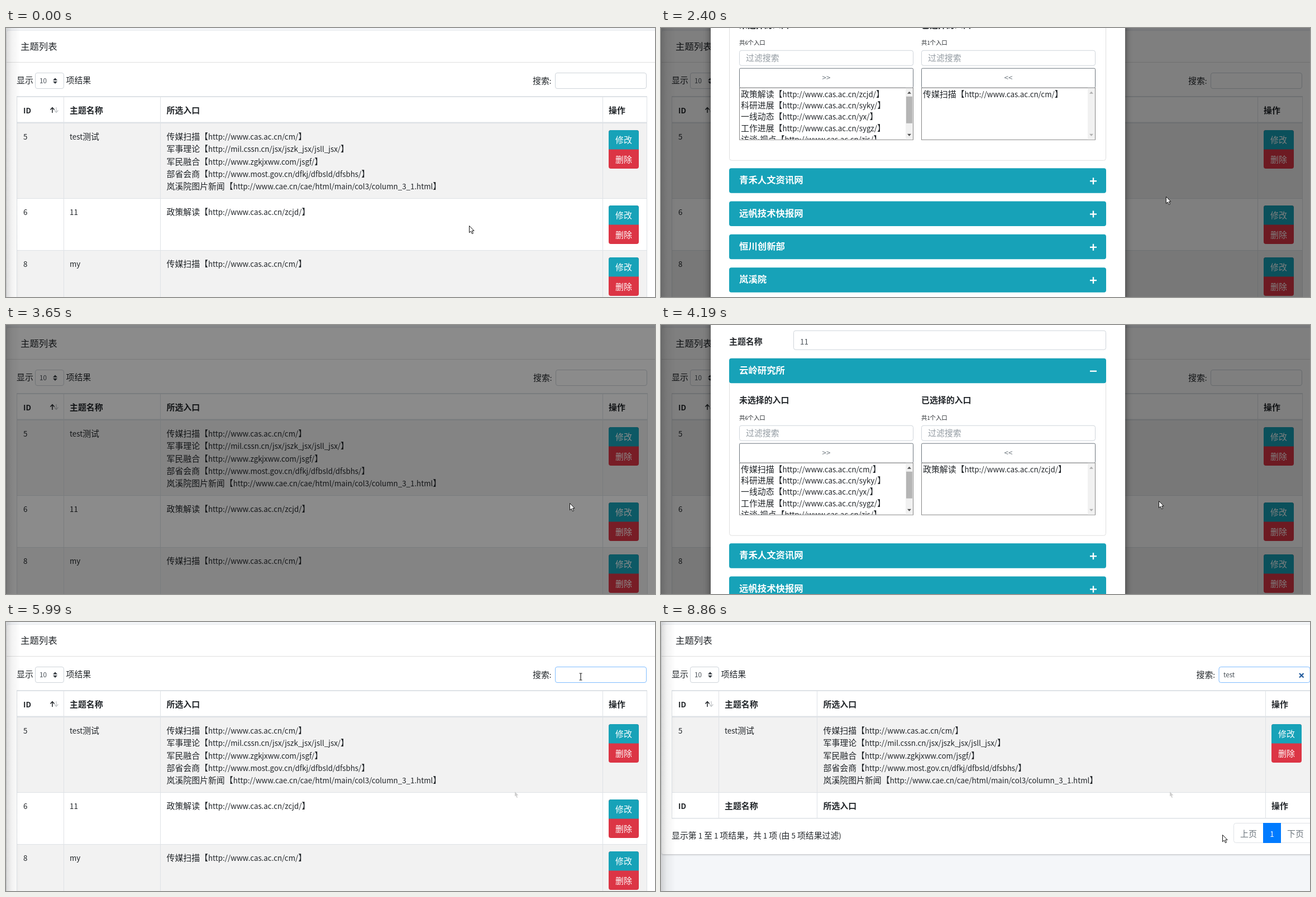
Animation, 1162 px wide and 482 px high, one loop 9030 ms. Source, as an HTML page:

```html
<!DOCTYPE html>
<html lang="zh-CN">
<head>
<meta charset="utf-8">
<title>主题列表</title>
<style>
html, body { margin: 0; width: 100%; height: 100%; overflow: hidden; background: #f4f6f9; }
svg { display: block; }
text { font-family: "Noto Sans CJK SC", "Noto Sans CJK JP", "Noto Sans CJK", sans-serif; white-space: pre; }
</style>
</head>
<body>
<svg id="stage" width="1162" height="482" viewBox="0 0 1162 482"></svg>
<script>
const LOOP = 9030, INK = '#212529', LINE = '#dee2e6', EDGE = '#ced4da', TEAL = '#17a2b8';
const stage = document.getElementById('stage');
const $ = id => document.getElementById(id);

// Latin runs are set smaller so they sit at the same em as the Chinese text; the middle dot stays narrow.
const latin = s => s
  .replace(/[ -~]+/g, run => `<tspan font-size=".895em">${run.replace(/</g, '&lt;')}</tspan>`)
  .replace('·', '<tspan font-family="Noto Sans, sans-serif">·</tspan>');
const text = (x, mid, s, { size = 14.9, bold, fill = INK, anchor = 'start' } = {}) =>
  `<text x="${x}" y="${mid + size * .37}" font-size="${size}" font-weight="${bold ? 700 : 400}" fill="${fill}" text-anchor="${anchor}">${latin(s)}</text>`;
const rect = (x, y, w, h, fill, r = 0, more = '') =>
  `<rect x="${x}" y="${y}" width="${w}" height="${h}" fill="${fill}" rx="${r}" ${more}/>`;
const box = (x, y, w, h, r = 3.5, stroke = EDGE, more = '') =>
  rect(x + .5, y + .5, w - 1, h - 1, '#fff', r, `stroke="${stroke}" ${more}`);
const path = (d, fill, more = '') => `<path d="${d}" fill="${fill}" ${more}/>`;

// Entries: title and address
const url = (name, address) => `${name}【http://${address}】`;
const media = url('传媒扫描', 'www.cas.ac.cn/cm/');
const policy = url('政策解读', 'www.cas.ac.cn/zcjd/');
const others = [['科研进展', 'syky'], ['一线动态', 'yx'], ['工作进展', 'sygz'], ['访谈·视点', 'zjs']]
  .map(([name, dir]) => url(name, `www.cas.ac.cn/${dir}/`));
const rows = [
  { y: 171, h: 134, id: '5', name: 'test测试', list: [media,
    url('军事理论', 'mil.cssn.cn/jsx/jszk_jsx/jsll_jsx/'),
    url('军民融合', 'www.zgkjxww.com/jsgf/'),
    url('部省会商', 'www.most.gov.cn/dfkj/dfbsld/dfsbhs/'),
    url('岚溪院图片新闻', 'www.cae.cn/cae/html/main/col3/column_3_1.html')] },
  { y: 305, h: 93, id: '6', name: '11', list: [policy] },
  { y: 398, h: 93, id: '8', name: 'my', list: [media] },
];

function buttons(x, y) {
  return rect(x, y, 54, 69, '#dc3545', 4) +
    path(`M${x} ${y + 34.5}v-30.5q0 -4 4 -4h46q4 0 4 4v30.5z`, TEAL) +
    text(x + 27, y + 17, '修改', { fill: '#fff', anchor: 'middle' }) +
    text(x + 27, y + 52.5, '删除', { fill: '#fff', anchor: 'middle' });
}

function table(cols, shown, bottom, foot) {
  const [c1, c2, c3] = cols;
  const heads = mid => ['ID', '主题名称', '所选入口', '操作'].map((s, i) =>
    text([31, c1 + 11, c2 + 11.5, c3 + 11][i], mid, s, { bold: true })).join('');
  const width = foot ? 1143 : 1129;
  let out = heads(147) +
    path(`M${c1 - 20} 152v-9.5m-3.6 4l3.6 -4l3.6 4`, 'none', `stroke="${INK}" stroke-width="1.5"`) +
    path(`M${c1 - 13} 142v9.5m-3.4 -4l3.4 4l3.4 -4`, 'none', 'stroke="#c4c7ca" stroke-width="1.3"');
  shown.forEach((row, i) => {
    if (i % 2 === 0) out += rect(19, row.y, width, row.h, '#f2f2f2');
    const mid = row.y + (i ? 24 : 23.5);
    out += text(31, mid, row.id) + text(c1 + 11, mid, row.name) +
      row.list.map((s, n) => text(c2 + 11.5, mid + n * 22.35, s)).join('') +
      buttons(c3 + 11, row.y + (i ? 13 : 12));
  });
  out += rect(19, 122, width, 2, LINE) + rect(19, 168.5, width, 2.5, LINE);
  out += shown.slice(1).map(row => rect(19, row.y, width, 1, LINE)).join('');
  out += [19, ...cols].map(x => rect(x, 122, 1, bottom - 122, LINE)).join('');
  if (foot) out += rect(19, 305, width, 1, LINE) + heads(329) + rect(19, 351, width, 1.5, LINE);
  return out;
}

function results() {
  const gray = { fill: '#6c757d' };
  return table([103, 279, 1082], rows.slice(0, 1), 352, true) +
    text(19, 382, '显示第 1 至 1 项结果，共 1 项 (由 5 项结果过滤)') +
    box(1025, 360, 150, 36, 4, LINE) + rect(1078, 360, 32, 36, '#007bff') +
    text(1037, 379, '上页', gray) + text(1121, 379, '下页', gray) +
    text(1094, 379, '1', { fill: '#fff', anchor: 'middle' });
}

const searchBox = () => '<g id="search">' +
  text(943, 94, '搜索:') + box(983, 80, 164, 29, 3.5, EDGE, 'id="field"') +
  '<g id="typed"></g>' +
  path('M1127.5 92l7.5 7.5m0 -7.5l-7.5 7.5', 'none', 'id="clear" stroke="#1f5a9c" stroke-width="2.2"') +
  rect(0, 86, 1, 17, '#111', 0, 'id="caret"') +
  rect(1147, 122, 1, 360, LINE, 0, 'id="edge"') + '</g>';

function picker(x, title, options, arrow, active) {
  const tint = active ? '#505050' : '#b0b0b0', bar = x + 298;
  return text(x, 104, title, { bold: true }) +
    text(x, 135, `共${active ? 6 : 1}个入口`, { size: 10.4 }) +
    box(x, 149, 312, 28) + text(x + 12, 162.5, '过滤搜索', { fill: '#939ba2' }) +
    box(x, 181, 312, 36, 2, '#6c757d') + text(x + 156, 198, arrow, { anchor: 'middle', fill: '#6c757d' }) +
    box(x, 216, 312, 94, 0, '#868686') +
    `<svg x="${x + 1}" y="217" width="297" height="92">` +
    options.map((s, i) => text(2, 10.5 + i * 20.3, s)).join('') + '</svg>' +
    rect(bar, 217, 13, 92, '#f1f1f1') + (active ? rect(bar + 1, 232, 11, 48, '#b5b5b5') : '') +
    path(`M${bar + 3} 227l3.5 -4l3.5 4zM${bar + 3} 299l3.5 4l3.5 -4z`, tint);
}

function modal(id, name, free, chosen) {
  const sites = ['云岭研究所', '青禾人文资讯网', '远帆技术快报网', '恒川创新部', '岚溪院'];
  let out = rect(89, -150, 742, 1000, '#fff', 0, 'filter="url(#deep)"') + `<g id="${id}body">` +
    text(122, -1, '主题名称', { bold: true }) +
    box(237, -21, 560, 35) + text(249, -1, name, { fill: '#495057' }) +
    box(122, 29, 675, 318, 4, '#dfdfdf') +
    picker(140, '未选择的入口', free, '>>', true) +
    picker(466, '已选择的入口', chosen, '<<', false);
  sites.forEach((site, i) => {
    const y = i ? 301.2 + i * 59.3 : 29, mid = y + 23;
    out += rect(122, y, 675, 44.5, TEAL, 4) +
      text(140, mid - 2, site, { size: 16.4, bold: true, fill: '#fff' }) +
      rect(768, mid - 1.2, 12, 2.4, '#fff') + (i ? rect(772.8, mid - 6, 2.4, 12, '#fff') : '');
  });
  return `<g id="${id}">${out}</g></g>`;
}

const arrowShape = 'M.5 .5v12.2l2.9 -2.6l2.1 4.6l2 -.9l-2 -4.5h3.6z';
stage.innerHTML = `
  <defs>
    <linearGradient id="shade"><stop stop-opacity=".15"/><stop offset=".4" stop-opacity=".05"/><stop offset="1" stop-opacity="0"/></linearGradient>
    <filter id="soft" x="-5%" y="-5%" width="110%" height="110%"><feDropShadow dx="0" dy="1" stdDeviation="1.4" flood-opacity=".25"/></filter>
    <filter id="deep" x="-5%" y="-5%" width="110%" height="110%"><feDropShadow dx="0" dy="7" stdDeviation="7" flood-opacity=".5"/></filter>
  </defs>` +
  rect(0, 0, 1162, 482, '#f4f6f9') +
  rect(1, 5, 1190, 600, '#fff', 4, 'id="card" filter="url(#soft)"') +
  text(26, 33, '主题列表', { size: 16.4 }) + rect(1, 61, 1161, 1, '#dfdfdf') +
  text(19, 93.5, '显示') + text(107.5, 93.5, '项结果') +
  box(52, 80, 52, 29) + text(60, 94.5, '10', { size: 13, fill: '#495057' }) +
  path('M84 93.7l4 -4.2l4 4.2zM84 95.7l4 4.2l4 -4.2z', '#343a40') +
  `<g id="full">${table([103, 276, 1068], rows, 482)}</g><g id="found">${results()}</g>` +
  searchBox() + rect(0, 0, 26, 482, 'url(#shade)') +
  path('M911 304l6.5 6.5h-3l1.5 4l-1.5 .6l-1.8 -4l-1.7 1.5z', '#cfcfcf', 'id="trace"') +
  rect(0, 0, 1162, 482, '#000', 0, 'id="backdrop"') +
  modal('m0', 'test测试', [policy, ...others], [media]) +
  modal('m1', '11', [media, ...others], [policy]) +
  '<g id="cursor">' +
  path(arrowShape, '#fff', 'id="arrow" stroke="#111" stroke-width="1"') +
  path('M-1.2 9V1.5q1.2 -2 2.4 0V6q1.4 -1 2.3 .4q1.4 -.7 2.2 .6q1.8 -.5 2 1.2v4.3l-1.6 4.2H-1L-4.3 10.4q.8 -2 3.1 .6z', '#fff', 'id="hand" stroke="#111" stroke-width="1"') +
  path('M-2.5 -6H0m0 0h2.5M0 -6V6M-2.5 6h5', 'none', 'id="beam" stroke="#222" stroke-width="1.2"') +
  '</g>';

const ramp = (t, start, length) => Math.min(1, Math.max(0, (t - start) / length));
const easeOut = p => 1 - (1 - p) ** 1.7;
const smooth = p => p * p * (3 - 2 * p);
const show = (id, on) => $(id).setAttribute('display', on ? 'inline' : 'none');

const track = [
  [0, 829, 354], [70, 829, 354], [700, 1112, 184], [950, 1116, 193], [1400, 1116, 193],
  [1940, 902, 298], [2480, 904, 302], [2710, 904, 302], [3060, 1109, 330], [3440, 1109, 330],
  [3650, 1009, 319], [4050, 891, 315], [4510, 891, 315], [4760, 911, 302], [4840, 911, 302],
  [5210, 1008, 337], [5400, 1008, 337], [5590, 1029, 98], [7650, 1029, 98],
  [8240, 989, 147], [8420, 989, 147], [8600, 965, 260], [8860, 1005, 381], [LOOP, 1005, 381],
];
function pointer(t) {
  const i = track.findIndex(k => k[0] > t), [t0, x0, y0] = track[i - 1], [t1, x1, y1] = track[i];
  const p = smooth((t - t0) / (t1 - t0));
  return [x0 + (x1 - x0) * p, y0 + (y1 - y0) * p];
}

// The backdrop fades before the dialog opens and after it has closed.
const dialogs = [{ open: 1255, close: 2683 }, { open: 3665, close: 4454 }];
const FOCUS = 5490, FILTER = 6690;
const typing = [[FOCUS, '', 0], [6460, 't', 4.4], [FILTER, 'te', 10.8], [7070, 'tes', 16.3], [7150, 'test', 20.7]];

function draw(t) {
  let dim = 0, blocked = false;
  dialogs.forEach(({ open, close }, i) => {
    dim += .5 * (ramp(t, open - 150, 150) - ramp(t, close + 300, 150));
    blocked ||= t > open - 150 && t < close + 300;
    const alpha = ramp(t, open, 150) - ramp(t, close, 150);
    const drop = easeOut(ramp(t, open, 300)) - easeOut(ramp(t, close, 300));
    show('m' + i, alpha > 0);
    $('m' + i).setAttribute('opacity', alpha);
    $('m' + i).setAttribute('transform', `translate(0 ${50 * drop - 19.3})`);
  });
  $('m0body').setAttribute('transform', `translate(0 ${-150 * smooth(ramp(t, 1980, 500))})`);
  $('backdrop').setAttribute('opacity', dim);

  const filtered = t >= FILTER, focused = t >= FOCUS;
  show('full', !filtered);
  show('found', filtered);
  show('trace', t >= 4900);
  $('card').setAttribute('height', filtered ? 411 : 600);
  $('edge').setAttribute('height', filtered ? 230 : 360);
  $('search').setAttribute('transform', `translate(${filtered ? 15.5 : t > 1090 && t < 5440 ? 1 : 0} 0)`);
  $('field').setAttribute('stroke', focused ? '#80bdff' : EDGE);

  const [since, word, width] = typing.filter(k => k[0] <= t).pop() || typing[0];
  if ($('typed').textContent !== word) {
    $('typed').innerHTML = word && text(991.5, 94.5, word, { size: 13, fill: '#495057' });
  }
  show('clear', word);
  show('caret', focused && Math.floor((t - since) / 500) % 2 === 0);
  $('caret').setAttribute('x', 991.5 + width);

  const [x, y] = pointer(t);
  const overButton = x >= 1079 && x < 1133 && (y >= 183 && y < 252 || y >= 318 && y < 387);
  const hand = overButton && !blocked && !filtered;
  const beam = focused && x > 983 && y > 80 && y < 109;
  show('hand', hand);
  show('beam', beam);
  show('arrow', !hand && !beam);
  $('cursor').setAttribute('transform', `translate(${x} ${y})`);
}

const start = performance.now();
(function tick() {
  draw((performance.now() - start) % LOOP);
  requestAnimationFrame(tick);
})();
</script>
</body>
</html>
```
